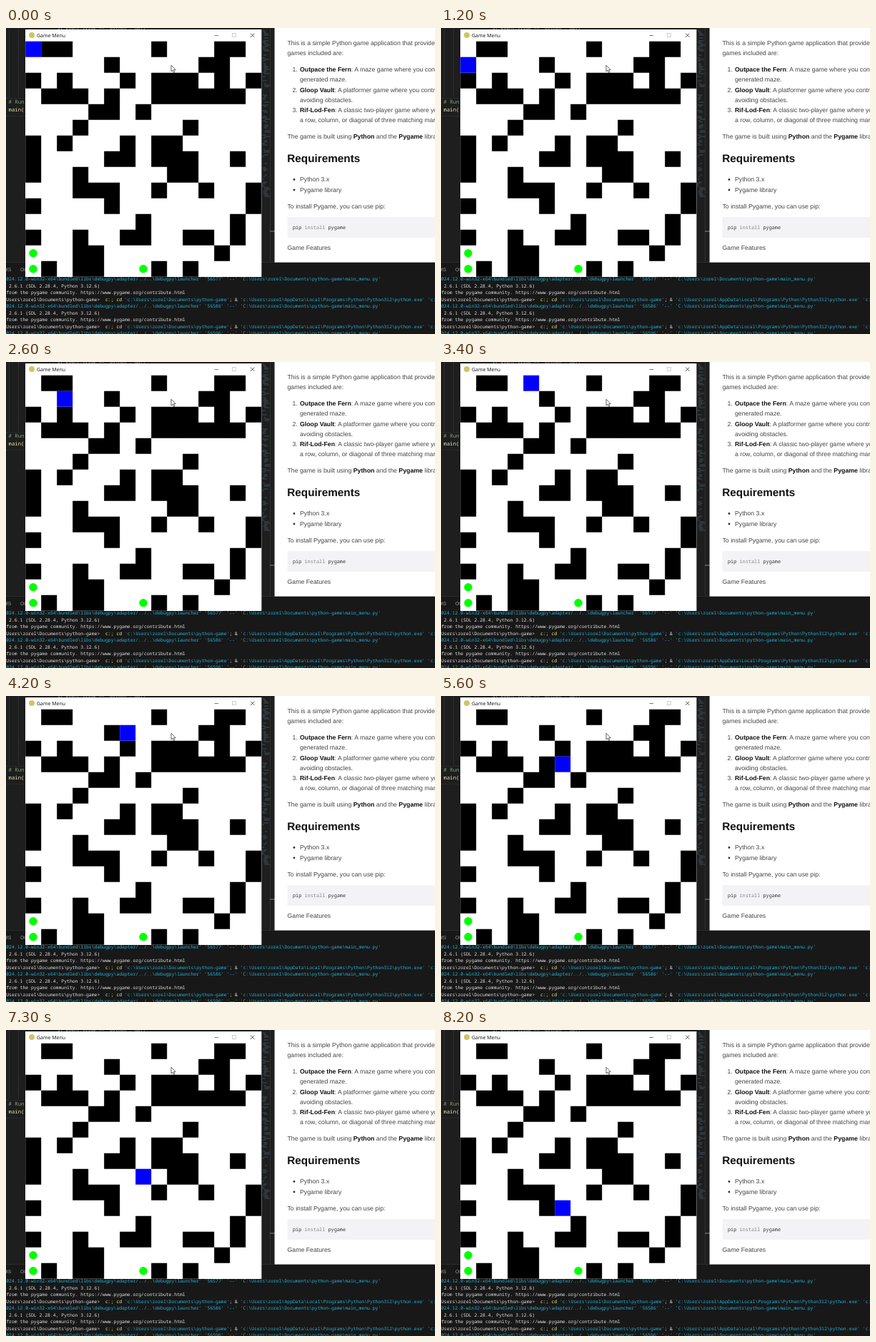
An HTML page for the animation above (8500 ms loop, 600 by 429 pixels).

```html
<!DOCTYPE html>
<html lang="en">
<head>
<meta charset="utf-8">
<title>Maze game</title>
<style>
  html, body { margin: 0; width: 100%; height: 100%; overflow: hidden; background: #1e1e1e; }
  svg { display: block; width: 100vw; height: 100vh; }
  text { white-space: pre; text-rendering: geometricPrecision; }
  .doc { font: 8.74px "Liberation Sans", Arial, sans-serif; fill: #444; }
  .doc tspan { font-weight: bold; fill: #111; }
  .head { font: bold 15.3px "Liberation Sans", Arial, sans-serif; fill: #111; }
  .tab { font: 6.8px "Liberation Sans", Arial, sans-serif; fill: #9d9d9d; }
  .mono { font: 500 6.43px "Noto Sans Mono", "DejaVu Sans Mono", monospace; fill: #e2e2e2; }
  .code { font-size: 7.3px; }
  .path { fill: #1fb4dc; }
  .cmd { fill: #f4f49a; }
</style>
</head>
<body>
<svg id="stage" viewBox="0 0 600 429" preserveAspectRatio="none">
  <rect width="600" height="429" fill="#1e1e1e"/>
  <g id="editor">
    <path d="M4.5 0V97M17.5 0V97" stroke="#343434" stroke-width=".7"/>
    <path d="M0 98.5H27M0 123.5H27" stroke="#303030" stroke-width=".7"/>
    <text class="mono" x="72" y="2" style="fill:#8c8c8c">if event.slide == 'python': go()</text>
    <text class="mono code" x="3.5" y="106" style="fill:#7fa070"># Run</text>
    <text class="mono code" x="3.5" y="116.5" style="fill:#e6e6b4">main()</text>
    <g id="minimap"></g>
    <path d="M369.5 0V328" stroke="#303030"/>
    <path d="M369 285H376" stroke="#888"/>
  </g>

  <rect y="328" width="600" height="101" fill="#181818"/>
  <path d="M0 328.5H600" stroke="#2b2b2b"/>
  <text class="tab" x="-3" y="341">MS</text>
  <text class="tab" x="20" y="341">OUTPUT</text>
  <g id="terminal"></g>

  <rect x="375.6" width="224.4" height="328.6" fill="#fff"/>
  <rect x="393.5" y="265" width="206.5" height="29" fill="#f3f3f5"/>
  <g id="page"></g>

  <g id="window">
    <rect x="27" y="2" width="330.4" height="347" fill="#fff"/>
    <circle cx="36" cy="10" r="4" fill="#cfc564"/>
    <text x="43" y="12.7" font-family="Open Sans, sans-serif" font-size="7" fill="#111">Game Menu</text>
    <g fill="none" stroke-width=".8">
      <path d="M291.5 10.5H297" stroke="#555"/>
      <rect x="316.5" y="7.5" width="5" height="5" stroke="#c4c4c4"/>
      <path d="M342 7.5L347.5 13M347.5 7.5L342 13" stroke="#333"/>
    </g>
    <path id="walls"/>
    <g id="coins" fill="#00ff00"></g>
    <rect id="player" width="22" height="22" fill="#0000ff"/>
    <path d="M231 52.2V61L233 59.2L234.6 62.5L236 61.8L234.5 58.7H237.3Z" fill="#fff" stroke="#222" stroke-width=".7"/>
  </g>
</svg>
<script>
const $ = id => document.getElementById(id);
const CELL = 22, LEFT = 27.2, TOP = 18.7, LOOP = 8500;

const maze = [
  ".##.....#...##.",
  ".....#.....##..",
  "#.#...#.###.#.#",
  ".###.#..######.",
  "....##.#.......",
  "...#......#....",
  "#.#...#.##.....",
  "#....##.###..#.",
  "#..#.....##....",
  "...###..#..#..#",
  "#....#........#",
  ".......#.....#.",
  "#..#..##..##.#.",
  "...##.......#..",
  ".#.##...#.#....",
];
$("walls").setAttribute("d", maze.flatMap((row, y) => [...row].map((c, x) =>
  c === "#" ? `M${LEFT + x * CELL} ${TOP + y * CELL}h22v22h-22z` : "")).join(""));

$("coins").innerHTML = [[0, 13], [0, 14], [7, 14]].map(([x, y]) =>
  `<circle cx="${LEFT + x * CELL + 10.8}" cy="${TOP + y * CELL + 11}" r="5.7"/>`).join("");

// Each line: x, baseline, content
const page = [
  [393.5, 24, "This is a simple Python game application that provides"],
  [393.5, 38.2, "games included are:"],
  [400.5, 61.2, "1."],
  [411, 61.2, "<tspan>Outpace the Fern</tspan>: A maze game where you control"],
  [411, 75.2, "generated maze."],
  [400.5, 89.5, "2."],
  [411, 89.5, "<tspan>Gloop Vault</tspan>: A platformer game where you control"],
  [411, 103.5, "avoiding obstacles."],
  [400.5, 118, "3."],
  [411, 118, "<tspan>Rif-Lod-Fen</tspan>: A classic two-player game where you"],
  [411, 132.2, "a row, column, or diagonal of three matching marks."],
  [393.5, 154.6, "The game is built using <tspan>Python</tspan> and the <tspan>Pygame</tspan> library."],
  [411, 215.2, "Python 3.x"],
  [411, 229.7, "Pygame library"],
  [393.5, 253, "To install Pygame, you can use pip:"],
  [393.5, 310.8, "Game Features"],
];
$("page").innerHTML = page.map(([x, y, s]) => `<text class="doc" x="${x}" y="${y}">${s}</text>`).join("") +
  `<text class="head" x="393.3" y="187.9">Requirements</text>
   <circle cx="403" cy="212.5" r="1.4" fill="#333"/><circle cx="403" cy="227" r="1.4" fill="#333"/>
   <text class="mono" x="401" y="281.6" style="font-size:6.86px;fill:#333">pip <tspan fill="#858585">install</tspan> pygame</text>`;

const home = String.raw`\Users\zorel`, project = home + String.raw`\Documents\python-game`;
const span = (cls, s) => `<tspan class="${cls}">${s}</tspan>`;
const launch = port => span("path",
  String.raw`2024.12.0-win32-x64\bundled\libs\debugpy\adapter/../..\debugpy\launcher' '${port}' '--' 'C:${project}\main_menu.py'`);
const version = "e 2.6.1 (SDL 2.28.4, Python 3.12.6)";
const greeting = " from the pygame community. https://www.pygame.org/contribute.html";
const prompt = `${project}&gt;  ${span("cmd", "c:;")} ${span("cmd", "cd")} ${span("path", `'c:${project}'`)}; &amp; ` +
  span("path", String.raw`'c:${home}\AppData\Local\Programs\Python\Python312\python.exe' 'c:${home}`);
$("terminal").innerHTML = [
  launch(56577), version, greeting, prompt,
  launch(56586), version, greeting, prompt, launch(56596),
].map((s, i) => `<text class="mono" x="-3.6" y="${354.4 + i * 9.5}">${s}</text>`).join("");

let seed = 7;
const random = () => (seed = seed * 16807 % 2147483647) / 2147483647;
let strokes = "";
for (let y = 2; y < 238; y += 2) {
  if (random() < .3) continue;
  const x = 358 + random() * 4;
  strokes += `M${x.toFixed(1)} ${y}h${(2 + random() * 6).toFixed(1)}`;
}
$("minimap").innerHTML = `<path d="${strokes}" stroke="#55788a" stroke-width=".8" opacity=".7"/>`;

// Key presses: time in ms and direction
const moves = [
  [1200, "D"], [2100, "R"], [2400, "R"], [2700, "R"], [3000, "R"], [3300, "U"],
  [3500, "R"], [3700, "R"], [4100, "D"], [4400, "R"], [4600, "D"], [4800, "D"],
  [5400, "L"], [5700, "D"], [6000, "D"], [6300, "R"], [6800, "D"],
  [7200, "D"], [7300, "D"], [7400, "D"], [7900, "D"], [8100, "L"],
];
const steps = { U: [0, -1], D: [0, 1], L: [-1, 0], R: [1, 0] };

function draw(t) {
  let x = 0, y = 0;
  for (const [at, key] of moves) {
    if (t < at) break;
    x += steps[key][0];
    y += steps[key][1];
  }
  $("player").setAttribute("x", LEFT + x * CELL);
  $("player").setAttribute("y", TOP + y * CELL);
}

const start = performance.now();
function tick() {
  draw((performance.now() - start) % LOOP);
  requestAnimationFrame(tick);
}
tick();
</script>
</body>
</html>
```
